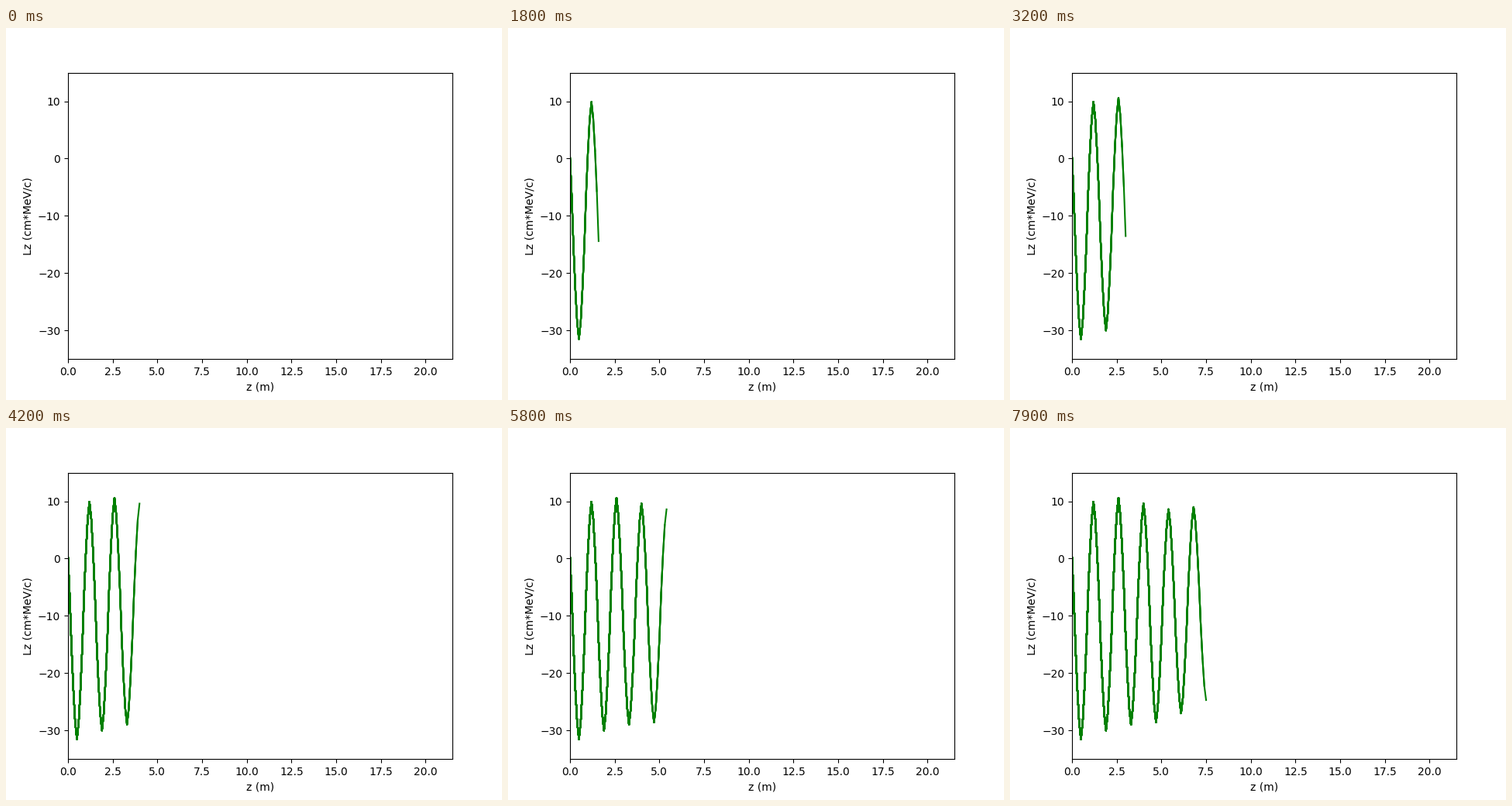
Animation, 640 px wide and 480 px high, one loop 8000 ms. Source, as a matplotlib script:

```python
import numpy as np
import matplotlib.pyplot as plt
from matplotlib.animation import FuncAnimation

FRAMES, INTERVAL = 80, 100
STEP, HALF = 0.1, 0.7          # sample spacing and half period in metres
FIRST = -0.2                   # position of the first extremum
EXTREMA = [8.8, -31.5, 9.9, -30.0, 10.6, -29.0, 9.6,
           -28.6, 8.6, -27.0, 9.0, -24.7, 9.0]


def momentum(z):
    """Oscillation running through the listed extrema, slightly pointed."""
    k = int((z - FIRST) / HALF + 1e-9)
    a, b = EXTREMA[k], EXTREMA[k + 1]
    c = np.cos(np.pi * ((z - FIRST) / HALF - k))
    c -= 0.35 * c**3 * (1 - c * c)
    return (a + b) / 2 + (a - b) / 2 * c


def last_sample(frame):
    """Index of the newest sample, with a short pause at 4.1 m."""
    n = frame - 2
    return n if n <= 41 else max(41, n - 2)


z = np.arange(76) * STEP
lz = np.array([momentum(v) for v in z])

fig, ax = plt.subplots(figsize=(6.4, 4.8), dpi=100)
ax.set_xlim(0, 21.5)
ax.set_ylim(-35, 15)
ax.set_xlabel("z (m)")
ax.set_ylabel("Lz (cm*MeV/c)")

# Each frame lays one more, longer line over the earlier ones.
lines = []
for f in range(FRAMES):
    n = max(last_sample(f) + 1, 0)
    lines += ax.plot(z[:n], lz[:n], color="green", lw=1.5, visible=False)


def update(frame):
    for i, line in enumerate(lines):
        line.set_visible(3 <= i <= frame)
    return lines


anim = FuncAnimation(fig, update, frames=FRAMES, init_func=lambda: update(0),
                     interval=INTERVAL, repeat=True, repeat_delay=0)
plt.show()
```
